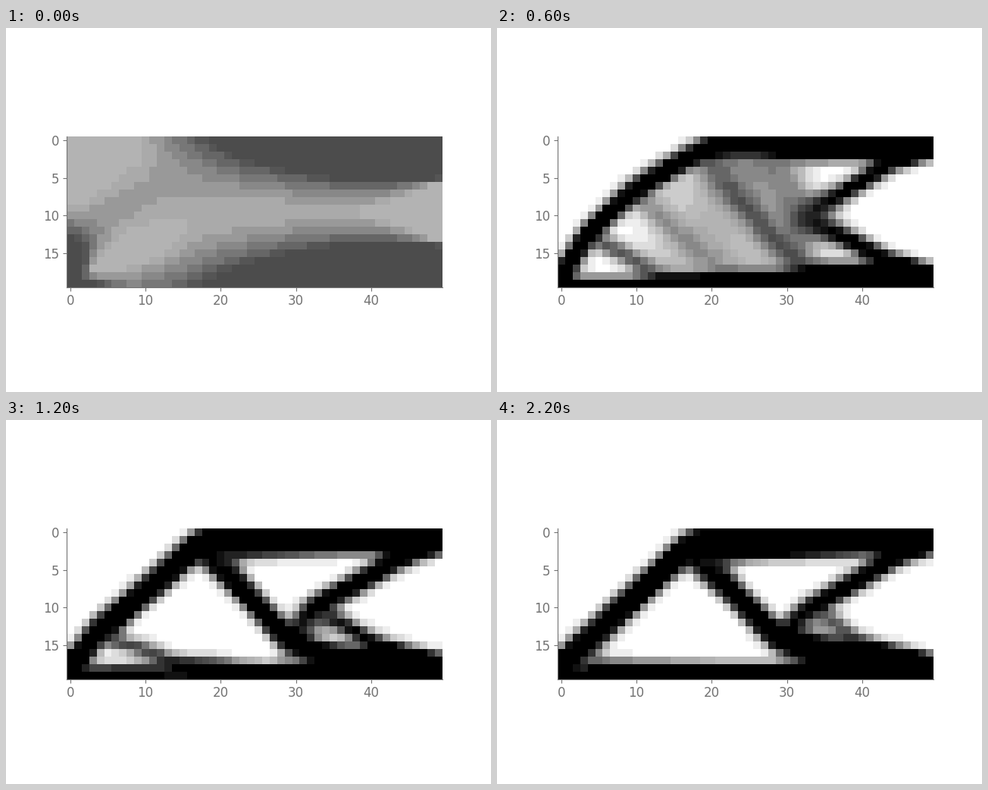
These frames come from a looping animation (640x480 px, 2.4 s). A matplotlib script:

```python
import numpy as np
import matplotlib.pyplot as plt
from matplotlib.animation import FuncAnimation

NX, NY = 50, 20
VOLUME, PENALTY, RADIUS, MOVE, X_MIN = 0.5, 3, 1.5, 0.2, 1e-3
GRIP = NY // 4  # held nodes at each end of the right edge
FRAMES, STEPS = 12, 5
INK = "0.45"


def element_stiffness(nu=0.3):
    """Plane-stress stiffness of a unit square element."""
    k = np.array([1/2 - nu/6, 1/8 + nu/8, -1/4 - nu/12, -1/8 + 3*nu/8,
                  -1/4 + nu/12, -1/8 - nu/8, nu/6, 1/8 - 3*nu/8])
    order = np.array([[0, 1, 2, 3, 4, 5, 6, 7], [1, 0, 7, 6, 5, 4, 3, 2],
                      [2, 7, 0, 5, 6, 3, 4, 1], [3, 6, 5, 0, 7, 2, 1, 4],
                      [4, 5, 6, 7, 0, 1, 2, 3], [5, 4, 3, 2, 1, 0, 7, 6],
                      [6, 3, 4, 1, 2, 7, 0, 5], [7, 2, 1, 4, 3, 6, 5, 0]])
    return k[order] / (1 - nu**2)


KE = element_stiffness()
BLOCK = 2 * (NY + 1)
SIZE = BLOCK * (NX + 1)
row, col = np.mgrid[:NY, :NX]
top_left = BLOCK * col + 2 * row
EDOF = top_left[..., None] + np.array(
    [2, 3, BLOCK + 2, BLOCK + 3, BLOCK, BLOCK + 1, 0, 1])
wall = np.arange(SIZE - BLOCK, SIZE)
HELD = np.concatenate([wall[:2 * GRIP], wall[-2 * GRIP:]])


def displacements(x):
    """Right edge held at both ends, load down on the lower left corner."""
    K = np.zeros((SIZE, SIZE))
    np.add.at(K, (EDOF[..., :, None], EDOF[..., None, :]),
              x[..., None, None]**PENALTY * KE)
    K[HELD, HELD] += 1e6

    def block(i, j):
        return K[i*BLOCK:(i + 1)*BLOCK, j*BLOCK:(j + 1)*BLOCK]

    # condense node columns from the wall to the free end
    schur = block(NX, NX)
    gains = []
    for c in range(NX - 1, -1, -1):
        gain = np.linalg.solve(schur, block(c + 1, c))
        schur = block(c, c) - block(c, c + 1) @ gain
        gains.append(gain)

    load = np.zeros(BLOCK)
    load[-1] = -1
    u = [np.linalg.solve(schur, load)]
    for gain in reversed(gains):
        u.append(-gain @ u[-1])
    return np.concatenate(u)


def cone_sum(a):
    reach = int(np.ceil(RADIUS)) - 1
    padded = np.pad(a, reach)
    total = np.zeros_like(a)
    for dy in range(-reach, reach + 1):
        for dx in range(-reach, reach + 1):
            w = max(0, RADIUS - np.hypot(dx, dy))
            total += w * padded[reach + dy:reach + dy + NY,
                                reach + dx:reach + dx + NX]
    return total


CONE_WEIGHT = cone_sum(np.ones((NY, NX)))


def improve(x):
    """One optimality-criteria step on the density field."""
    ue = displacements(x)[EDOF]
    energy = np.einsum("yxi,ij,yxj->yx", ue, KE, ue)
    gain = PENALTY * x**(PENALTY - 1) * energy
    gain = cone_sum(x * gain) / (CONE_WEIGHT * x)

    low, high = 0.0, 1e9
    while (high - low) / (high + low) > 1e-5:
        mid = (low + high) / 2
        new = np.clip(x * np.sqrt(gain / mid),
                      np.maximum(X_MIN, x - MOVE), np.minimum(1, x + MOVE))
        if new.mean() > VOLUME:
            low = mid
        else:
            high = mid
    return new


LEVELS = np.sort(np.append(np.linspace(0, 1, 16), [0.3, 0.7]))


def shade(x):
    """Brightness of each cell, snapped to a short grey scale."""
    nearest = np.abs((1 - x)[..., None] - LEVELS).argmin(axis=-1)
    return LEVELS[nearest]


def history():
    x = improve(np.full((NY, NX), VOLUME))
    shades = [shade(x)]
    while len(shades) < FRAMES:
        for _ in range(STEPS):
            x = improve(x)
        shades.append(shade(x))
    return shades


shades = history()

plt.rcParams["font.family"] = "DejaVu Sans"
fig, ax = plt.subplots(figsize=(6.4, 4.8), dpi=100)
image = ax.imshow(shades[0], cmap="gray", vmin=0, vmax=1,
                  interpolation="nearest")
ax.set_xticks(range(0, NX, 10))
ax.set_yticks(range(0, NY, 5))
ax.tick_params(colors=INK, labelsize=12)
ax.spines[["top", "right"]].set_visible(False)
ax.spines[["left", "bottom"]].set_color(INK)


def update(i):
    image.set_data(shades[i])
    return [image]


anim = FuncAnimation(fig, update, frames=FRAMES, interval=200, repeat=True,
                     repeat_delay=0)
plt.show()
```
